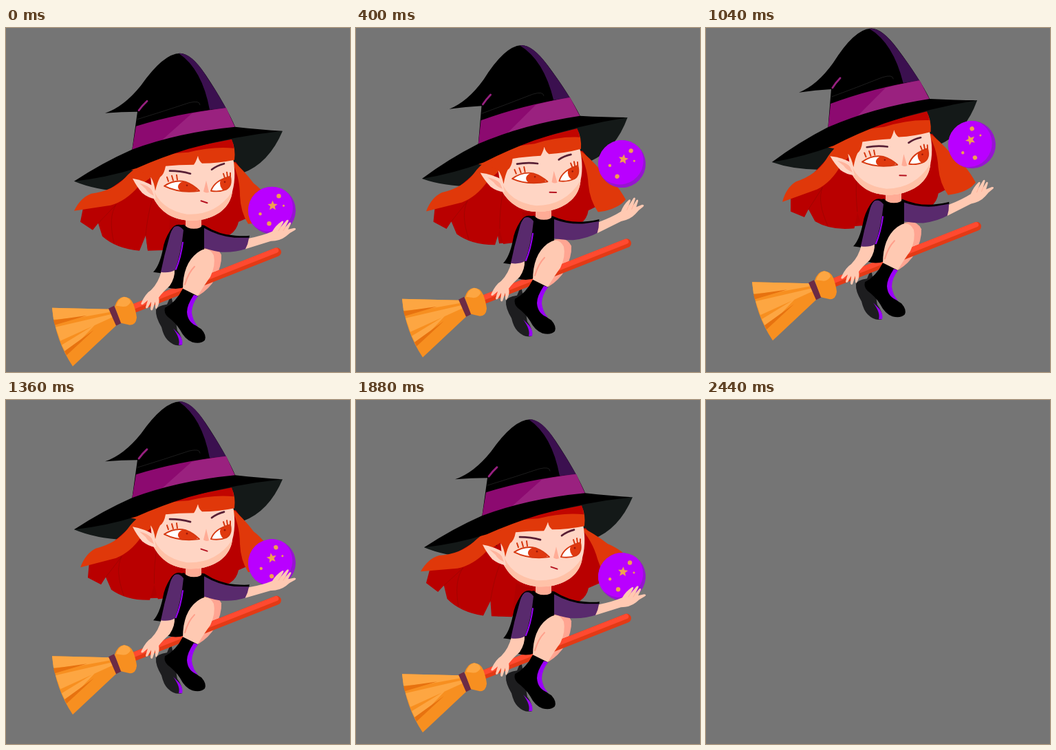
Animation of 500x500 px, one loop 2480 ms. Source, as an HTML page:

```html
<!DOCTYPE html>
<html lang="en">
<head>
<meta charset="utf-8">
<title>Little witch</title>
<style>
html, body { margin: 0; width: 100%; height: 100%; overflow: hidden; background: #757575; }
svg { display: block; width: 100vw; height: 100vh; }
.skin { fill: #ffc9b2; }
.red { fill: #b90000; }
.orange { fill: #e0380a; }
.violet { fill: #9a00f8; }
.plum { fill: #592a6d; }
.line { fill: none; stroke-linecap: round; stroke-linejoin: round; }
</style>
</head>
<body>
<svg viewBox="0 0 500 500">
<defs>
  <clipPath id="eyeL"><path d="M230 230Q245 220 261 224Q272 228 281 237Q252 241 230 230Z"/></clipPath>
  <clipPath id="eyeR"><path d="M298 237Q303 222 326 216Q329 230 320 235Q310 239 298 237Z"/></clipPath>
  <clipPath id="orb"><circle r="34.5"/></clipPath>
</defs>
<g id="witch">
  <g class="head">
    <path fill="#141918" d="M99 223Q130 236 172 238L344 211Q382 197 402 150L328 155L183 185Z"/>
    <path class="red" d="M205 200L203 300L206 323L240 322L300 307Q333 306 338 282L354 275L356 225L334 195Z"/>
    <path fill="#a90000" d="M204 240Q225 285 262 280L245 290Q228 320 206 323Z" opacity=".5"/>
    <g class="sway">
      <path class="red" d="M185 210L112 262L108 282L126 294L134 284L140 303Q160 321 194 324L203 302L206 324L236 323L240 240Z"/>
      <path class="line" stroke="#9d0500" stroke-width=".8" d="M160 257Q148 275 157 313M203 301Q206 270 213 248M160 257L134 284"/>
      <path class="orange" d="M226 186Q190 198 173 218Q155 237 124 241Q108 247 99 266L152 258Q174 252 192 231L214 215Z"/>
    </g>
    <path id="lock" class="orange" d="M326 190Q345 206 360 226Q379 240 393 269Q384 280 362 284L352 285Q341 268 340 244Q340 215 326 190Z"/>
  </g>

  <path fill="#ffa592" d="M285 322Q306 314 313 330Q314 345 304 365Q295 380 280 389L262 378Z"/>
  <path fill="#1d1d1f" d="M240 388L243 404L249 440Q257 450 256 461Q245 464 235 454Q229 448 226 435Q217 420 218 410Q220 404 234 402Z"/>
  <path class="violet" d="M243 437L252 446Q258 454 256 461L251 461Q254 452 243 437Z"/>

  <path class="line" stroke="#e23a16" stroke-width="13" d="M178 411L393.500 326"/>
  <path class="line" stroke="#ff4a30" stroke-width="7.500" d="M177 408.500L392.500 323.500"/>
  <path fill="#f78f20" d="M67 407L150 409L162 431L97 492Q72 455 67 407Z"/>
  <path fill="#fda642" d="M67 407L150 409L152 413L108 421L69 424ZM72 435L154 416L156 420L79 455ZM81 461L130 431L88 475Z"/>
  <path fill="#e7720f" d="M69 425L118 418L71 432ZM85 470L128 439L88 476Z"/>
  <path fill="#6c2b45" d="M149 408L157 404L168 429L160 433Z"/>
  <path fill="#f78f20" d="M158 405Q162 392 171 391Q181 391 185 401Q189 412 190 421Q189 432 180 432L167 429Z"/>
  <path fill="#fda642" d="M160 404Q164 392 172 391Q180 392 181 399Q176 407 168 405Z"/>

  <g class="arm">
    <path fill="#000" d="M270 288L288 287Q310 301 333 302Q346 303 354 302L352 312L288 305Z"/>
    <path class="plum" d="M270 291L288 291Q309 303 332 305L353 305Q353 315 349 321Q333 327 312 326Q298 324 275 316Z"/>
  </g>
  <path fill="#ffab95" d="M261 270H284V290Q272 298 261 290Z"/>
  <path fill="#000" d="M252 287L259 286Q263 292 273 292Q284 292 286 286L288 290V324Q270 340 262 376Q248 382 234 377L246 350Z"/>
  <path class="skin" d="M257 380Q257 343 278 327Q294 315 302 331Q305 345 297 362Q288 374 278 391Z"/>
  <path class="line" stroke="#ff9f8b" stroke-width="2" d="M274 347Q265 356 260 373"/>
  <path fill="#000" d="M257 379L279 390Q265 403 265 414Q268 429 284 438Q292 447 289 454Q283 460 271 457Q260 453 253 439Q246 428 235 420Q229 414 231 407Q247 399 257 379Z"/>
  <path class="violet" d="M273 388L279 390Q270 402 270 414Q272 427 279 434Q264 429 263 413Q263 403 273 388Z"/>

  <path fill="#000" d="M256 287Q246 283 239 294Q230 308 228 322Q223 346 214 355L228 357L250 310Z"/>
  <path class="skin" d="M226 353L245 351Q246 363 238 375Q227 385 222 392Q224 400 219 408Q217 409 217 406L217 398L213 410Q211 412 210 409L211 398L206 407Q203 409 203 406L206 396L199 402Q195 403 197 399Q203 386 211 381Q222 370 226 353Z"/>
  <path class="plum" d="M258 294Q252 286 245 289Q240 293 237 306Q230 330 225 355Q237 357 246 352Q255 325 258 294Z"/>
  <path class="line" stroke="#9a00f8" stroke-width="2" d="M257 312Q254 334 247 351"/>

  <g class="head">
    <path fill="#ffd5c4" d="M208 195L328 180Q336 213 329 238C326 262 306 275 284 279C250 284 226 272 213 245Z"/>
    <path fill="#ffc2a8" d="M213 231Q223 264 263 271Q305 273 329 238C326 262 306 275 284 279C250 284 226 272 213 245Z"/>
    <path fill="#ffd5c4" d="M184 219Q201 222 214 230L218 249Q206 247 198 240Q190 231 184 219Z"/>
    <path fill="#ffb49d" d="M194 226Q207 229 212 236L215 244Q206 240 203 234Z"/>
    <path class="orange" d="M180 206Q240 178 328 163Q334 175 332 192Q308 197 285 197Q280 193 279 186Q276 195 273 199Q250 199 232 201Q230 213 224 217Q220 224 217 237Q215 224 211 218Q203 210 180 206Z"/>
    <path fill="#c10500" d="M232 181L328 162Q331 169 331 175Q300 172 265 181Q230 183 210 190Z"/>

    <g fill="#fff">
      <path d="M230 230Q245 220 261 224Q272 228 281 237Q252 241 230 230Z"/>
      <path d="M298 237Q303 222 326 216Q329 230 320 235Q310 239 298 237Z"/>
    </g>
    <g fill="#e0390f">
      <ellipse cx="265" cy="231" rx="15" ry="9" clip-path="url(#eyeL)"/>
      <ellipse cx="320" cy="226" rx="9" ry="11" clip-path="url(#eyeR)"/>
    </g>
    <circle cx="263" cy="229" r="1.300" fill="#9a1608"/><circle cx="318" cy="224" r="1.300" fill="#9a1608"/>
    <path class="line" stroke="#d63810" stroke-width="1.900" d="M230 230Q245 220 261 224Q272 228 281 237Q252 241 230 230ZM298 237Q303 222 326 216Q329 230 320 235Q310 239 298 237Z"/>
    <path class="line" stroke="#d63810" stroke-width="2" d="M234 217L236 223M241 215L243 222M248 214L249 221M316 212L318 218M321 210L322 217M326 211L326 216"/>
    <path fill="#ffac96" d="M291 222L295 239Q291 241 287 238Z"/>
    <path id="brows" class="line" stroke="#582035" stroke-width="2.700"/>
    <path id="mouth" class="line" stroke="#b51220" stroke-width="2" d="M283.500 251.500L292.500 254.500"/>

    <path fill="#000" d="M144 124Q171 115 196 84Q229 37 253 37Q269 37 290 68Q320 113 334 146L183 179L191 122Q168 122 144 124Z"/>
    <path fill="#3b104f" d="M251 37Q269 36 289 67Q306 92 320 117L296 119Q285 60 251 37Z"/>
    <path class="line" stroke="#292929" stroke-width=".7" d="M191 133Q230 121 266 109Q282 105 282 112"/>
    <path class="line" stroke="#96207f" stroke-width="2.800" d="M193 120Q198 113 205 106.500"/>
    <path fill="#8c0a70" d="M189 143Q250 124 320 116.500L334 147L183 179Z"/>
    <path fill="#9a217f" d="M270 124.500Q297 119 320 116.500L334 147L218 171Z"/>
    <path fill="#000" d="M99 223Q140 196 183 177Q250 152 333 144Q370 148 402 150Q333 157 265 176Q226 188 190 204Q145 218 99 223Z"/>
  </g>

  <g id="ball">
    <circle r="34.500" fill="#9615d0"/>
    <circle cx="-4" cy="-4" r="34.500" fill="#b900ff" clip-path="url(#orb)"/>
    <g fill="#f0a050">
      <circle cx="10" cy="-21" r="3.200"/><circle cx="17" cy="-7" r="1.500"/>
      <circle cx="-17" cy="5" r="2.200"/><circle cx="-4" cy="19" r="3.200"/>
      <path id="star"/>
    </g>
  </g>
  <g class="arm">
    <path class="skin" d="M353 306Q373 302 387 296Q392 287 401 281Q404 280 403 283L399 290L408 279.500Q411 278 410.500 281L406 290L412 283Q415 282 414 285L410 293L419 291Q423 292 420 294Q412 298 407 303Q398 310 385 310L348 321.500Q352 314 353 306Z"/>
    <path class="line" stroke="#ffab94" stroke-width=".8" d="M399 290L396 295M406 290L403 295"/>
  </g>
</g>
</svg>
<script>
const $ = id => document.getElementById(id);
const LOOP = 2480, STEP = 40;
const BOB = [[-60, 0], [1100, -38], [1180, -38], [2200, 0], [2480, 0]];
const TOSS = [[0, 0], [125, 0], [740, 1], [1320, -.05], [1600, 0], [2480, 0]];
const SWAY = [[0, 0], [400, 5], [720, 9], [1230, 17], [1680, -4], [2080, -8], [2480, 0]];
const SPIN = [[0, 0], [400, 9], [800, -28], [1360, -11], [1680, 5], [2080, 1.5], [2480, 0]];

const place = (el, value) => el.setAttribute('transform', value);
const placeAll = (name, value) => document.querySelectorAll('.' + name).forEach(el => place(el, value));
const clamp = v => Math.max(0, Math.min(1, v));

// Hermite curve through the keys; flat = 0 makes each key a rest point.
function curve(keys, t, flat = 1) {
  let i = 0;
  while (i < keys.length - 2 && t > keys[i + 1][0]) i++;
  const slope = k => {
    const a = keys[Math.max(0, k - 1)], b = keys[Math.min(keys.length - 1, k + 1)];
    return flat * (b[1] - a[1]) / (b[0] - a[0]);
  };
  const [t0, a] = keys[i], [t1, b] = keys[i + 1], d = t1 - t0;
  const u = (t - t0) / d, v = 1 - u;
  return a * v * v * (1 + 2 * u) + b * u * u * (3 - 2 * u)
    + d * u * v * (slope(i) * v - slope(i + 1) * u);
}

function starPath(cx, cy, r) {
  let d = '';
  for (let i = 0; i < 10; i++) {
    const a = i * Math.PI / 5 - Math.PI / 2, q = i % 2 ? r * .45 : r;
    d += (i ? 'L' : 'M') + (cx + q * Math.cos(a)) + ' ' + (cy + q * Math.sin(a));
  }
  return d + 'Z';
}

function draw(t) {
  $('witch').style.display = t >= LOOP - STEP ? 'none' : '';
  const bob = curve(BOB, t, 0), toss = curve(TOSS, t, 0);
  const sway = curve(SWAY, t), calm = clamp(toss / .4);
  place($('witch'), `translate(0 ${bob})`);
  placeAll('head', `rotate(${-7.2 * clamp(toss)} 270 285)`);
  placeAll('arm', `rotate(${-21.5 * toss} 285 300)`);
  placeAll('sway', `translate(${.2 * sway} 0) rotate(${-.49 * sway} 215 210)`);
  place($('lock'), `rotate(${-15 * clamp(-sway / 4)} 332 200)`);
  place($('ball'), `translate(386.5 ${265.5 - 130 * toss}) rotate(${curve(SPIN, t)})`);
  place($('mouth'), `rotate(${-14 * calm} 288 253)`);
  $('brows').setAttribute('d',
    `M238 ${208 + calm}Q254 ${208 - calm} 268 ${212 - 2 * calm}M299 206Q307 ${200 + calm} 317 ${197.5 + 2 * calm}`);
}

$('star').setAttribute('d', starPath(1, -7, 7.5));
const start = performance.now();
function tick() {
  const t = (performance.now() - start) % LOOP;
  draw(Math.floor(t / STEP) * STEP);
  requestAnimationFrame(tick);
}
tick();
</script>
</body>
</html>
```
